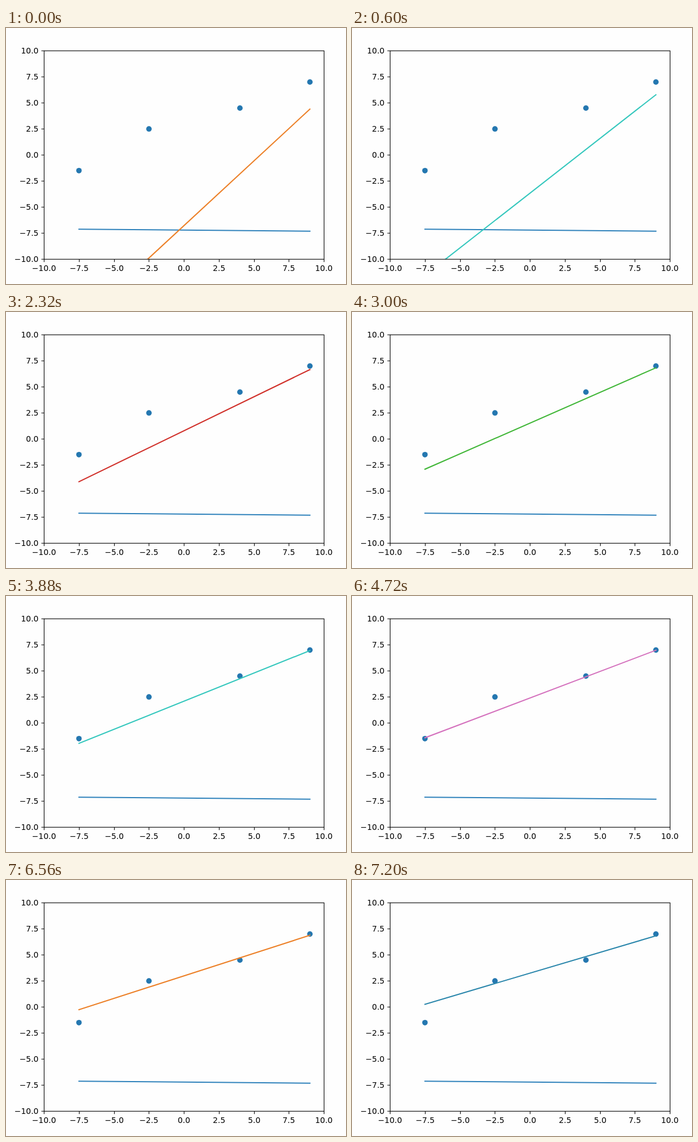
An HTML page for the animation above (7240 ms loop, 600 by 452 pixels).

```html
<!DOCTYPE html>
<html lang="en">
<head>
<meta charset="utf-8">
<title>Line fit</title>
<style>
  html, body { margin: 0; width: 100%; height: 100%; overflow: hidden; background: #fefefe; }
  svg { display: block; }
  text { font: 13.89px "DejaVu Sans", Verdana, sans-serif; fill: #000; }
  .axis { fill: none; stroke: #000; stroke-width: 1.11; }
  .line { stroke-width: 2.08; stroke-linecap: square; }
</style>
</head>
<body>
<svg width="600" height="452" viewBox="0 0 600 452">
  <clipPath id="area"><rect x="67" y="40" width="494" height="368"/></clipPath>
  <g id="dots" fill="#2477b0"></g>
  <g clip-path="url(#area)">
    <line id="start" class="line" stroke="#2f82bb"/>
    <line id="fit" class="line"/>
  </g>
  <path id="ticks" class="axis"/>
  <rect class="axis" x="67.3" y="40.3" width="494" height="368"/>
  <g id="labels"></g>
</svg>
<script>
const $ = id => document.getElementById(id);
const X = v => 314 + 24.7 * v;
const Y = v => 224.2 - 18.4 * v;
const LEFT = -7.5, RIGHT = 9;
const FRAME_MS = 40, FRAMES = 181;
const COLORS = ['#2a86ab', '#ec8028', '#40b637', '#d0302a', '#9467bd',
                '#8c564b', '#d471bd', '#7f7f7f', '#bcbd22', '#34c7bd'];

// Line heights at both ends and running colour index, at key frames
const keys   = [0, 15, 40, 75, 118, 148, 180];
const leftY  = [-16.1, -11.54, -6.17, -2.9, -1.42, -0.74, 0.26];
const rightY = [4.4, 5.78, 6.38, 6.83, 6.98, 6.93, 6.83];
const hues   = [1, 19, 53, 92, 146, 182, 220];

const secant = (ys, i) => (ys[i + 1] - ys[i]) / (keys[i + 1] - keys[i]);

function tangent(ys, i) {
  if (i === 0) return secant(ys, 0);
  if (i === keys.length - 1) return secant(ys, i - 1);
  return (secant(ys, i - 1) + secant(ys, i)) / 2;
}

function segment(f) {
  let i = 0;
  while (i < keys.length - 2 && f >= keys[i + 1]) i++;
  return i;
}

// Cubic Hermite curve through the key values
function curve(ys, f) {
  const i = segment(f), span = keys[i + 1] - keys[i];
  const u = (f - keys[i]) / span, w = 1 - u;
  return w * w * (1 + 2 * u) * ys[i] + u * u * (3 - 2 * u) * ys[i + 1]
    + span * u * w * (w * tangent(ys, i) - u * tangent(ys, i + 1));
}

function colorAt(f) {
  const i = segment(f);
  const n = hues[i] + secant(hues, i) * (f - keys[i]);
  return COLORS[Math.floor(n + 1e-6) % 10];
}

function setLine(el, a, b, color) {
  const attrs = { x1: X(LEFT), y1: Y(a), x2: X(RIGHT), y2: Y(b) };
  for (const k in attrs) el.setAttribute(k, attrs[k]);
  if (color) el.setAttribute('stroke', color);
}

let ticks = '', labels = '';
for (let v = -10; v <= 10; v += 2.5) {
  const x = Math.round(X(v)) + 0.3, y = Math.round(Y(v)) + 0.3;
  const s = v.toFixed(1).replace('-', '\u2212');
  ticks += `M${x} 408.3v4.86M67.3 ${y}h-4.86`;
  labels += `<text x="${x - 0.3}" y="429" text-anchor="middle">${s}</text>`
    + `<text x="57.4" y="${y + 4.9}" text-anchor="end">${s}</text>`;
}
$('ticks').setAttribute('d', ticks);
$('labels').innerHTML = labels;
$('dots').innerHTML = [[-7.5, -1.5], [-2.5, 2.5], [4, 4.5], [9, 7]]
  .map(([x, y]) => `<circle cx="${X(x)}" cy="${Y(y)}" r="4.85"/>`).join('');
setLine($('start'), -7.12, -7.31);

const t0 = performance.now();
function draw(now) {
  const f = Math.floor(Math.max(0, now - t0) / FRAME_MS) % FRAMES;
  setLine($('fit'), curve(leftY, f), curve(rightY, f), colorAt(f));
  requestAnimationFrame(draw);
}
draw(t0);
</script>
</body>
</html>
```
